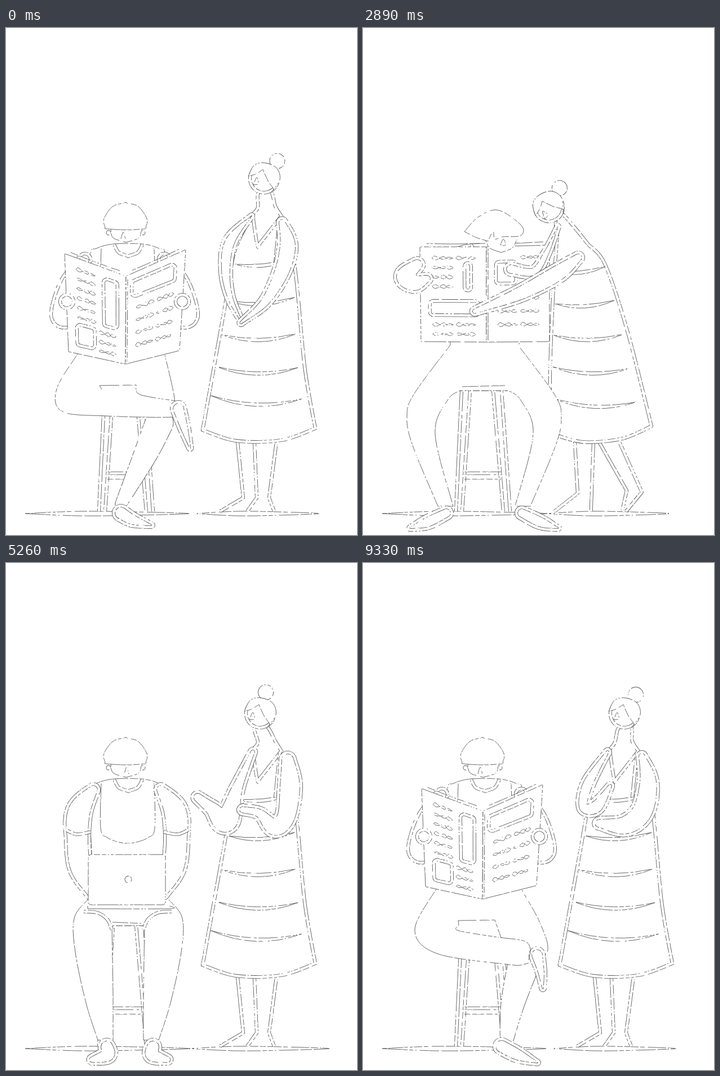
Animation, 623 px wide and 899 px high, one loop 9.41 s. Source, as an HTML page with a canvas:

```html
<!DOCTYPE html>
<html lang="en">
<head>
<meta charset="utf-8">
<title>Reading on a stool</title>
<style>
html,body{margin:0;width:100%;height:100%;overflow:hidden;background:#fff}
canvas{display:block;width:623px;height:899px}
</style>
</head>
<body>
<canvas id="stage" width="623" height="899"></canvas>
<script>
const ctx = document.getElementById('stage').getContext('2d');
const LOOP = 9410;

// ---- helpers ----
const group = (s, size) => {
  const n = s.split(' ').map(Number), out = [];
  for (let i = 0; i < n.length; i += size) out.push(n.slice(i, i + size));
  return out;
};
const pts = s => group(s, 2);   // x y; a doubled point is a sharp corner
const limb = s => group(s, 3);  // x y half-width along the middle
const mirror = (p, sum) => p.map(([x, ...rest]) => [sum - x, ...rest]);
const sym = (s, sum) => { const p = pts(s); return [...p, ...mirror(p, sum).reverse()]; };
const lerp = (a, b, t) => a + (b - a) * t;
const mid = (a, b, t) => a.map((n, i) => lerp(n, b[i], t));
let seed = 7;
const random = () => (seed = seed * 16807 % 2147483647) / 2147483647;

// Ink with small random breaks, so that thin lines look sketched
function makeInk() {
  const tile = document.createElement('canvas'), g = tile.getContext('2d');
  tile.width = tile.height = 128;
  g.fillStyle = '#555';
  g.fillRect(0, 0, 128, 128);
  for (let i = 0; i < 420; i++) g.clearRect(random() * 126, random() * 126, 3, 3);
  return ctx.createPattern(tile, 'repeat');
}
const INK = makeInk();

// ---- the woman ----
const leg = (hip, ankle, toe, y) => pts(`${hip} 734 ${ankle} ${y} ${ankle} ${y} ${toe} 857`);

// headX sways the head; bun is its angle from upright
const stand = (headX, bun, wArmL, wArmR) => ({
  wh: [[headX, 267, bun, 0]],
  neck: [...pts('438 330 447 318'), [headX - 10, 292], [headX + 12, 290], ...pts('478 316 490 335')],
  vneck: pts('438 333 446 384 452 380 488 334'),
  strap: pts('486 337 482 375 478 415'),
  front: pts('438 330 406 395 391 480 349 713'), back: pts('488 334 512 420 530 600 549 710'),
  rows: [[414, 69, -2.2]],
  leg1: leg(411, 421, 380, 833), leg2: leg(441, 445, 428, 833), leg3: leg(480, 467, 476, 833),
  wArmL: limb(wArmL), wArmR: limb(wArmR), ground: pts('325 862 574 860')
});
const lean = (head, front, back, row, hips, wArmL, wArmR) => ({
  wh: [head], front: pts(front), back: pts(back), rows: [[row, 58, 0]],
  neck: [pts(front)[0], [head[0] + 12, head[1] + 24], [head[0] + 24, head[1] + 12], pts(back)[0]],
  leg1: leg(hips, 381, 340, 825), leg2: leg(hips + 33, 405, 405, 850),
  leg3: leg(hips + 43, 468, 460, 820), leg4: leg(hips + 79, 495, 467, 823),
  wArmL: limb(wArmL), wArmR: limb(wArmR), ground: pts('325 862 545 860')
});
const bentArm = '500 349 13 504 395 20 497 450 18 476 468 17 450 444 10 422 438 8';
const foldArm = '495 343 8 506 388 17 496 440 20 465 465 18 422 462 10';

const wait = {
  ...stand(458, 37, '436 333 3 398 378 11 390 430 10 398 478 7 417 518 4',
    '490 345 8 500 385 16 489 433 15 460 485 10 420 520 5'),
  ground: pts('337 862 556 861')
};
const peek = lean([294, 342, 27, -40], '330 366 326 470 318 660 330 728', '383 388 420 435 455 540 503 709',
  436, 368, '337 380 3 330 430 5 305 490 4', '361 408 12 359 445 18 335 495 18 295 540 14 246 565 6');
const point = lean([330, 318, 29, -40], '345 365 337 480 332 640 342 722', '400 384 430 420 470 540 512 706',
  428, 376, '346 352 3 325 400 7 303 432 9 265 428 10', '382 407 9 345 435 16 280 470 14 204 500 7');
const clap = stand(463, 46, '398 420 22 372 385 16 352 360 12 333 341 7',
  '499 345 6 484 388 20 450 419 22 418 390 16 395 362 13 374 341 7');
const talk = stand(451, 15, '438 335 6 410 400 12 391 457 22 366 436 14 342 417 10', bentArm);
const wave = stand(447, 17, '430 350 22 390 362 20 355 343 20 346 300 12 345 260 11 356 230 4', bentArm);
const fold = {
  ...stand(464, 31, '434 335 5 400 390 11 391 432 10 414 432 13 437 398 6', foldArm),
  ground: wait.ground
};
const foldLow = { ...fold, wArmL: limb('434 335 5 400 390 11 391 432 10 420 436 13 446 414 6') };

// ---- the man ----
const hairTop = sym('176 354 174 338 190 316 213 310', 424);
const headAt = (fringe, noseX, chin) => ({
  ears: limb(`182 ${fringe + 7} 4`), earR: limb(`243 ${fringe + 7} 4`),
  face: sym(`186 ${fringe} 190 ${chin - 8} 213 ${chin}`, 426),
  hair: [...hairTop, ...pts(`248 354 247 ${fringe} 213 ${fringe + 2} 178 ${fringe} 176 354`)],
  nose: pts(`${noseX - 4} ${chin - 6} ${noseX} ${chin - 18} ${noseX + 4} ${chin - 6}`)
});
const torso = {
  torso: sym('155 562 150 470 150 400 160 391 190 383', 432),
  bib: sym('169 390 168 470 180 487 205 496', 432),
  collar: sym('192 384 200 398 216 404', 434)
};
const pair = (key, p, sum) => ({ [key + 'L']: p, [key + 'R']: mirror(p, sum) });
const cuff = pts('106 473 125 481 150 477');
const foreArm = limb('155 402 10 132 440 20 126 476 21 116 535 20 142 520 13 170 490 5');
const wide = {
  trousers: sym('155 562 90 650 78 690 88 740 133 848 133 848 160 848 160 848 128 720 150 660 172 643 172 643', 430),
  ...pair('shoe', limb('148 860 10 115 876 11 86 886 4'), 430),
  seat: pts('176 636 252 634')
};
const close = {
  trousers: sym('145 597 121 630 123 690 142 780 163 846 163 846 190 846 190 846 190 770 189 700 188 643 188 643', 434),
  ...pair('shoe', limb('179 858 13 180 872 14 155 880 8'), 440),
  seat: pts('189 637 240 639')
};
const crossed = {
  shin: limb('272 700 25 248 755 21 207 838 11'), shoe: limb('204 860 13 225 872 11 256 881 4'),
  thigh: pts('127 578 90 640 100 680 180 688 293 690 299 682 298 650 282 580'),
  foot: limb('306 675 12 316 708 9 326 742 4'),
  seat: pts('170 641 166 634 166 634 231 633 231 633 238 650 300 661')
};
const crossedLow = {
  shin: limb('285 712 28 266 780 21 255 845 12'), shoe: limb('246 857 13 275 872 12 307 885 4'),
  thigh: pts('130 578 92 650 130 692 250 711 288 711 327 690 315 640 282 580'),
  foot: limb('309 695 12 316 725 8 319 752 4'),
  seat: pts('170 643 169 634 169 634 234 633 234 633 246 667'),
  knee: pts('168 644 170 652 235 663 285 670 297 684 294 704')
};
const reading = {
  ...torso, ...headAt(356, 208, 380),
  ...pair('arm', limb('140 410 10 112 455 16 98 508 18 114 515 15'), 421),
  ...pair('hand', limb('108 485 12'), 421),
  paper: pts('104 400 213 440 212 596 111 574 319 393 308 572'), lay: 'ab'
};
const flat = {
  ...torso, ...wide,
  face: sym('217 375 225 390 245 398', 490),
  hair: pts('180 361 200 371 222 378 222 378 231 360 234 374 250 370 280 368 281 350 240 323 205 335 180 361'),
  nose: pts('244 385 249 374 253 385 244 385'),
  handL: limb('96 420 12 75 440 18 92 452 16 112 445 9'),
  paper: pts('101 388 219 388 219 557 103 556 331 385 331 556'), lay: 'de'
};
const upward = {
  ...torso, ...wide, ...headAt(339, 213, 378),
  ...pair('arm', foreArm, 435), ...pair('cuff', cuff, 434)
};
const thrown = { paper: pts('106 35 215 72 216 236 110 203 321 26 311 202'), lay: 'fg' };
const gone = { ...thrown, paper: thrown.paper.map(([x, y]) => [x, y - 280]) };
const typing = {
  ...torso, ...close, ...headAt(356, 214, 380),
  ...pair('arm', limb('155 402 10 130 440 22 127 490 21 132 540 20 150 583 10'), 430),
  ...pair('cuff', cuff, 430), ...pair('lap', pts('138 618 162 620 180 632 188 650'), 432),
  lid: pts('146 517 283 517 283 606 146 606'), base: pts('145 608 145 613 145 613 288 613 290 608'),
  dot: limb('217 561 6')
};
const texting = {
  ...upward, ...headAt(356, 214, 380),
  armR: limb('280 402 10 299 440 19 304 480 18 304 520 18 272 486 12 240 458 7'),
  cuffR: mirror(cuff, 428), phone: pts('220 424 245 421 250 466 225 471')
};

// ---- timeline: start, end, steps, pose reached ----
const f = (...parts) => Object.assign({}, ...parts);
const first = f(reading, crossed, wait), turned = f(first, { lay: 'ac' });
const leaning = f(turned, peek);
for (const k of ['armR', 'handR', 'strap', 'vneck']) delete leaning[k];
const shaken = f(turned, { paper: reading.paper.map(([x, y], i) => [x, y + (i < 2 ? 4 : 0)]) });
const steps = [
  [0, 0, 1, first],
  [290, 660, 5, turned],
  [990, 1070, 2, shaken],
  [1150, 1150, 1, turned],
  [1320, 1640, 5, leaning],
  [2040, 2890, 11, f(flat, point)],
  [2970, 3890, 12, f(upward, thrown, clap)],
  [4060, 4500, 6, f(upward, gone, clap)],
  [4580, 5260, 9, f(typing, talk)],
  [5760, 7040, 16, f(texting, wave)],
  [7290, 7610, 5, f(texting, foldLow)],
  [7940, 8100, 3, f(texting, fold)],
  [8270, 8830, 8, f(reading, wide, fold)],
  [9250, 9330, 2, f(reading, crossedLow, fold)]
];

function sample(p, at) {
  const x = at * (p.length - 1), i = Math.min(Math.max(0, p.length - 2), Math.floor(x));
  return mid(p[i], p[i + 1] || p[i], x - i);
}
function morph(a, b, t) {
  if (t >= 1) return b;
  if (a.length === b.length) return a.map((p, i) => mid(p, b[i], t));
  const n = Math.max(a.length, b.length);
  return Array.from({ length: n }, (_, i) => mid(sample(a, i / (n - 1)), sample(b, i / (n - 1)), t));
}
function mix(A, B, t) {
  const out = {};
  for (const k in { ...A, ...B }) {
    const near = t < .5 ? A[k] : B[k];
    if (k !== 'lay' && A[k] && B[k]) out[k] = morph(A[k], B[k], t);
    else if (near) out[k] = near;
  }
  return out;
}

// ---- drawing: a/d double line, f/l single line, a/f filled, m/b double/single limb, q/Q single/double panel ----
const BACK = 'torso:f bib:l collar:d shin:b shoe:m trousers:f shoeL:m shoeR:m thigh:f foot:m seat:l knee:l ' +
  'lapL:d lapR:d phone:Q armL:m armR:m cuffL:d cuffR:d lid:q base:l dot:b';
const FRONT = 'handL:m handR:m ears:b earR:b face:f hair:f nose:l';

function curve(p) {
  const c = new Path2D();
  c.moveTo(...p[0]);
  p.slice(1).forEach((b, i) => {
    const a = p[i], q = p[i - 1] || a, r = p[i + 2] || b;
    if (a[0] === b[0] && a[1] === b[1]) return;
    c.bezierCurveTo(a[0] + (b[0] - q[0]) / 6, a[1] + (b[1] - q[1]) / 6,
      b[0] - (r[0] - a[0]) / 6, b[1] - (r[1] - a[1]) / 6, b[0], b[1]);
  });
  return c;
}
function ink(path, style) {
  const twin = style === 'a' || style === 'd';
  ctx.fillStyle = '#fff';
  if (style === 'a' || style === 'f') ctx.fill(path);
  ctx.strokeStyle = INK;
  ctx.lineWidth = twin ? 6 : .9;
  ctx.stroke(path);
  if (!twin) return;
  ctx.strokeStyle = '#fff';
  ctx.lineWidth = 4.3;
  ctx.stroke(path);
}
// A limb is the union of discs along its middle line, filled in shrinking layers
function drawLimb(p, rims) {
  const discs = [], n = 32;
  const spline = (a, b, c, d, t) => b + .5 * t * (c - a + t * (2 * a - 5 * b + 4 * c - d + t * (3 * (b - c) + d - a)));
  p.forEach((b, i) => {
    const c = p[i + 1] || b, a = p[i - 1] || b, d = p[i + 2] || c;
    for (let k = 0; k < n; k++) discs.push(b.map((_, j) => spline(a[j], b[j], c[j], d[j], k / n)));
  });
  rims.forEach((rim, i) => {
    const c = new Path2D();
    for (const [x, y, w] of discs) {
      const r = w + rim;
      if (r <= 0) continue;
      c.moveTo(x + r, y);
      c.arc(x, y, r, 0, 7);
    }
    ctx.fillStyle = i % 2 ? '#fff' : INK;
    ctx.fill(c);
  });
}
function panel(p, r, style) {
  const c = new Path2D();
  c.moveTo(...mid(p[0], p[1], .5));
  for (let i = 1; i <= 4; i++) c.arcTo(...p[i % 4], ...p[(i + 1) % 4], r);
  c.closePath();
  ink(c, style);
}
function draw(p, style) {
  if (style === 'm') drawLimb(p, [3, 2.15, -2.15, -3]);
  else if (style === 'b') drawLimb(p, [.45, -.45]);
  else if (style === 'q' || style === 'Q') panel(p, 5, style === 'q' ? 'f' : 'a');
  else ink(curve(p), style);
}
function layer(pose, list) {
  for (const item of list.split(' ')) {
    const [k, style] = item.split(':');
    if (pose[k]) draw(pose[k], style);
  }
}

function edgeX(edge, y) {
  let i = 1;
  while (i < edge.length - 1 && edge[i][1] < y) i++;
  const [a, b] = [edge[i - 1], edge[i]];
  return lerp(a[0], b[0], (y - a[1]) / (b[1] - a[1]));
}
function dress({ front, back, rows: [[top, gap, bend]] }) {
  const l = front[front.length - 1], r = back[back.length - 1];
  const hem = [.3, .7].map(t => [lerp(l[0], r[0], t), lerp(l[1], r[1], t) + (r[0] - l[0]) * .1]);
  draw([...front, l, ...hem, r, r, ...[...back].reverse().slice(1)], 'a');
  for (let k = 0; k < 5; k++) {
    const y = top + gap * k + bend * k * k, tilt = 2 * k - 5;
    const x1 = edgeX(front, y) + 4, x2 = edgeX(back, y) - 3 - 3 * k;
    const sag = (x2 - x1) * .1, x = (x1 + x2) / 2, c = new Path2D();
    c.moveTo(x1, y - tilt);
    c.quadraticCurveTo(x, y + sag * 2, x2, y + tilt);
    c.quadraticCurveTo(x, y + sag * 2 - 12, x1, y - tilt);
    ink(c, 'f');
  }
}
function womanHead([x, y, bun, tilt]) {
  const a = bun * Math.PI / 180;
  draw([[x + 39 * Math.sin(a), y - 39 * Math.cos(a), 13.5]], 'b');
  ctx.save();
  ctx.translate(x, y);
  ctx.rotate(tilt * Math.PI / 180);
  draw([[0, 0, 25]], 'm');
  draw(pts('-28 -4 -18 -23 0 -28 22 -19 28 2 12 25 12 25 17 19 7 4 -2 -16 -2 -16 -15 -8 -28 -4'), 'f');
  draw(pts('-19 11 -13 -2 -10 9 -19 11'), 'l');
  ctx.restore();
}

// Page boxes as u1 u2 v1 v2 in hundredths; text fills two columns around them
const boxes = {
  a: '63 86 11 63 16 47 69 91', b: '10 84 9 27', c: '12 91 73 92', d: '67 77 17 46 14 88 57 72',
  e: '15 47 16 39', f: '60 86 13 55 13 88 66 85', g: '13 45 9 34'
};
function textRow(a, b, phase) {
  const n = 3;
  for (let k = 0; k < n; k++) {
    const p = mid(a, b, k / n), q = mid(a, b, (k + .95) / n), h = 1.5 + 2.5 * Math.abs(Math.sin(phase + k * 7));
    const m = mid(p, q, .35 + .3 * (k % 2));
    draw([p, [m[0], m[1] - h], q, [m[0] + 1, m[1] + h * .8], p], 'l');
  }
}
function page(quad, key) {
  const at = (u, v) => mid(mid(quad[0], quad[1], u), mid(quad[3], quad[2], u), v);
  draw([at(.1, -.035), at(.48, -.03), at(.9, -.035)], 'l');
  panel(quad, 1, 'f');
  if (!key) return;
  const list = group(boxes[key], 4).map(b => b.map(n => n / 100));
  for (const [u1, u2, v1, v2] of list) panel([at(u1, v1), at(u2, v1), at(u2, v2), at(u1, v2)], 6, 'd');
  const gap = list.length > 1 ? .1 : .14;
  for (let v = .12; v < .93; v += gap) {
    for (const [from, to] of [[.18, .5], [.54, .84]]) {
      const hit = list.some(([u1, u2, v1, v2]) => from < u2 && to > u1 && v > v1 - .05 && v < v2 + .05);
      if (!hit) textRow(at(from, v), at(to, v), v * 40 + from);
    }
  }
}
function newspaper([tl, tm, bm, bl, tr, br], lay, turn) {
  page([tl, tm, bm, bl], lay[0]);
  page([tm, tr, br, bm], turn ? 'c' : lay[1]);
  draw([[tm[0] + 3, tm[1] + 3], [bm[0] + 3, bm[1] - 3]], 'l');
  if (turn > 0 && turn < 1) {
    const lift = 26 * Math.sin(turn * Math.PI), swing = (1 - Math.cos(turn * Math.PI)) / 2;
    const top = mid(tr, tl, swing), low = mid(br, bl, swing);
    page([tm, [top[0], top[1] - lift], [low[0], low[1] - lift * .6], bm], turn < .5 ? 'b' : '');
  }
}
function scenery([a, b]) {
  for (const [x1, x2] of [[32, 325], [a[0], b[0]]]) {
    const third = (x2 - x1) / 3;
    draw([[x1, 861], [x1 + third, 857], [x2 - third, 858], [x2, 861], [x2 - third, 864], [x1 + third, 865], [x1, 861]], 'l');
  }
  for (const [top, foot] of [[175, 165], [190, 176], [231, 249], [246, 261]]) draw([[top, 643], [foot, 857]], 'd');
  for (const y of [787, 792, 800]) draw([[180, y], [245, y]], 'l');
  draw([[172, 643], [262, 643]], 'l');
}

function render(t) {
  let i = steps.length - 1;
  while (t < steps[i][0]) i--;
  const [start, end, count, goal] = steps[i];
  const done = t >= end ? 1 : (Math.floor((t - start) / (end - start) * (count - 1)) + 1) / count;
  const pose = mix(i ? steps[i - 1][3] : goal, goal, done * done * (3 - 2 * done));
  ctx.fillStyle = '#fff';
  ctx.fillRect(0, 0, 623, 899);
  ctx.lineJoin = 'round';
  scenery(pose.ground);
  layer(pose, 'leg1:d leg2:d leg3:d leg4:d');
  dress(pose);
  layer(pose, 'neck:a vneck:d strap:d');
  layer(pose, BACK);
  if (pose.paper) newspaper(pose.paper, pose.lay, i === 1 ? done : 0);
  layer(pose, FRONT);
  layer(pose, 'wArmL:m wArmR:m');
  womanHead(pose.wh[0]);
}
function tick() {
  render(performance.now() % LOOP);
  requestAnimationFrame(tick);
}
tick();
</script>
</body>
</html>
```
